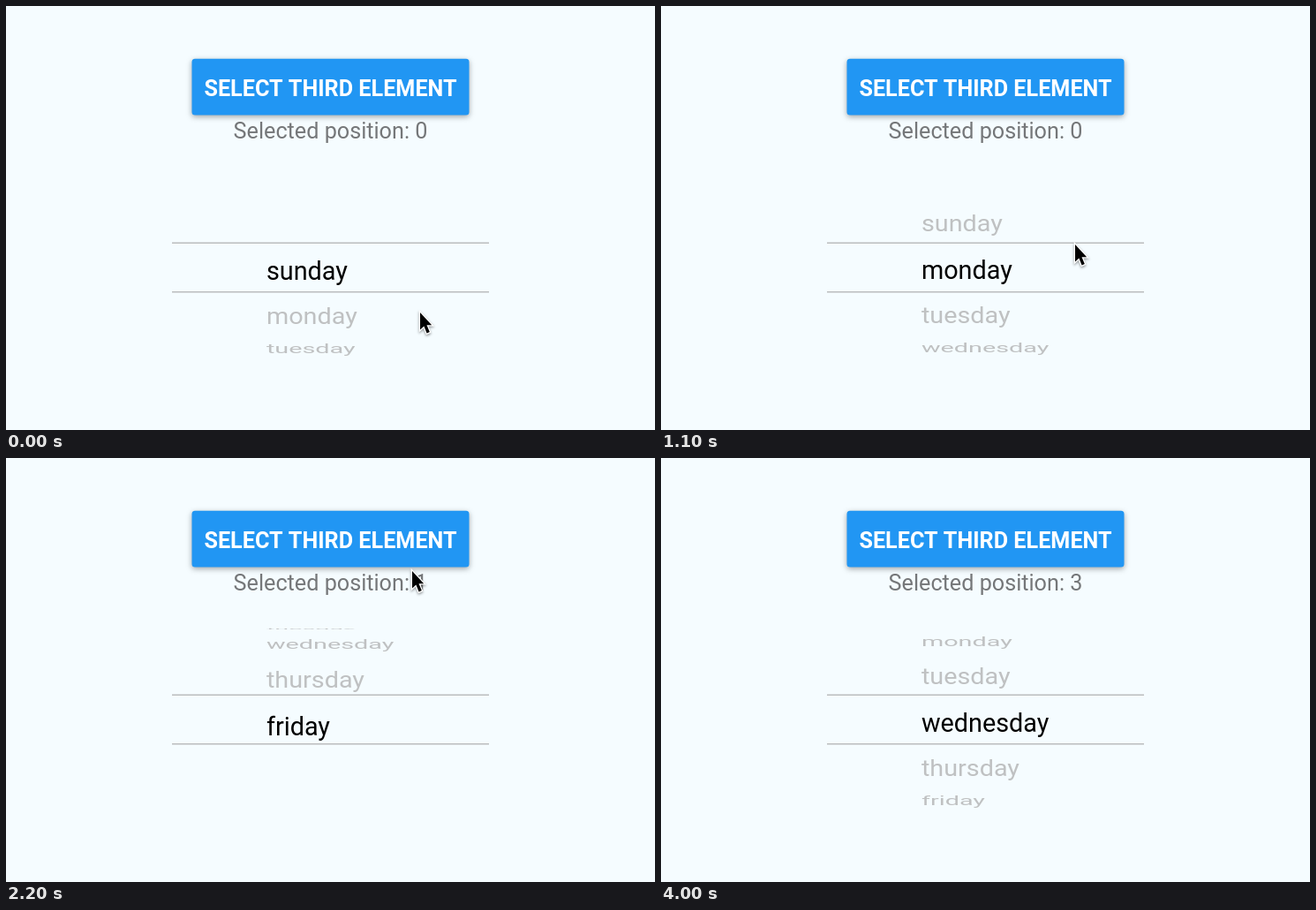
Recreate the animation shown at these times as an HTML page with a canvas. Size 735 by 480 pixels, loop 4200 ms.

```html
<!DOCTYPE html>
<html lang="en">
<head>
<meta charset="utf-8">
<title>Wheel picker</title>
<style>
  html, body { margin: 0; width: 100%; height: 100%; overflow: hidden; background: #f5fcff; }
  canvas { display: block; }
</style>
</head>
<body>
<canvas id="stage" width="735" height="480"></canvas>
<script>
const ctx = document.getElementById('stage').getContext('2d');
const LOOP = 4200, STEP = 100;
const DAYS = ['sunday', 'monday', 'tuesday', 'wednesday', 'thursday', 'friday'];
const WHEEL = { x: 294.9, y: 296.5, radius: 103.5, top: 268, bottom: 323.5, left: 188, right: 547 };
const ITEM_ANGLE = Math.PI / 6, ITEM_HEIGHT = WHEEL.radius * ITEM_ANGLE;
const TOUCH_SLOP = 14, SETTLE = 400, REPORT_DELAY = 200;
const PRESS = 3400, SELECT = 3500, PRESS_END = 4000;
const GRAY = '#bfc1c2';

const clamp = v => Math.max(0, Math.min(1, v));

// The pointer makes five curved moves and rests between them.
const home = { x: 469, y: 347 };
const moves = [
  { start: 200, end: 800, bend: { x: 469, y: 225 }, to: { x: 469, y: 270 } },
  { start: 1200, end: 1500, bend: { x: 462, y: 290 }, to: { x: 438, y: 320 } },
  { start: 1500, end: 2000, bend: { x: 456, y: 137 }, to: { x: 460, y: 128 } },
  { start: 2400, end: 2700, bend: { x: 510, y: 160 }, to: { x: 560, y: 193 } },
  { start: 2800, end: 3200, bend: { x: 380, y: 24 }, to: { x: 342, y: 87 } }
];

function cursorAt(t) {
  let from = home;
  for (const { start, end, bend, to } of moves) {
    if (t < end) {
      const p = clamp((t - start) / (end - start)), q = 1 - p;
      const curve = axis => q * q * from[axis] + 2 * p * q * bend[axis] + p * p * to[axis];
      return { x: curve('x'), y: curve('y') };
    }
    from = to;
  }
  return from;
}

// A drag turns the wheel with the pointer; on release it slows down into its target.
const drags = [
  { start: 200, release: 800, touchY: 347, from: 0, target: 1 },
  { start: 1500, release: 1900, touchY: 298, from: 1, target: 5 }
];

function wheelAt(t) {
  if (t >= SELECT) return 3;
  const drag = drags.findLast(d => t >= d.start);
  if (!drag) return 0;
  const travel = drag.touchY - TOUCH_SLOP - cursorAt(Math.min(t, drag.release)).y;
  const dragged = drag.from + Math.max(0, travel) / ITEM_HEIGHT;
  const left = 1 - clamp((t - drag.release) / SETTLE);
  return drag.target + (dragged - drag.target) * left * left;
}

function selectedAt(t) {
  if (t >= SELECT) return 3;
  const done = drags.findLast(d => t >= d.release + SETTLE + REPORT_DELAY);
  return done ? done.target : 0;
}

function setShadow(color, blur, y) {
  ctx.shadowColor = color;
  ctx.shadowBlur = blur;
  ctx.shadowOffsetY = y;
}

function label(text, font, color, y) {
  ctx.font = font;
  ctx.fillStyle = color;
  ctx.textAlign = 'center';
  ctx.fillText(text, 367.5, y);
}

function drawButton(t) {
  const press = t < PRESS ? 0 : clamp((PRESS_END - t) / 400);
  ctx.save();
  ctx.beginPath();
  ctx.roundRect(210.5, 59.8, 314, 63.7, 3.5);
  setShadow('rgba(0,0,0,.35)', 6 + 3 * press, 2 + press);
  ctx.fillStyle = '#2196f3';
  ctx.fill();
  setShadow('transparent', 0, 0);
  if (press) {
    ctx.clip();
    ctx.beginPath();
    ctx.arc(342, 88, (t - PRESS + STEP) * 0.6, 0, 2 * Math.PI);
    ctx.fillStyle = `rgba(0,0,0,${0.12 * press})`;
    ctx.fill();
  }
  ctx.restore();
  label('SELECT THIRD ELEMENT', 'bold 25.2px Roboto, sans-serif', '#fff', 102);
}

function drawDays(position, color, top, bottom) {
  ctx.save();
  ctx.beginPath();
  ctx.rect(0, top, 735, bottom - top);
  ctx.clip();
  ctx.font = '28.8px Roboto, sans-serif';
  ctx.textAlign = 'left';
  ctx.fillStyle = color;
  DAYS.forEach((day, i) => {
    const angle = (i - position) * ITEM_ANGLE;
    if (Math.abs(angle) >= Math.PI / 2 - 0.01) return;
    ctx.save();
    ctx.translate(WHEEL.x, WHEEL.y + WHEEL.radius * Math.sin(angle));
    ctx.scale(1, Math.cos(angle));
    ctx.fillText(day, 0, 13);
    ctx.restore();
  });
  ctx.restore();
}

function drawWheel(position) {
  drawDays(position, GRAY, 0, WHEEL.top);
  drawDays(position, '#000', WHEEL.top, WHEEL.bottom);
  drawDays(position, GRAY, WHEEL.bottom, 480);
  ctx.fillStyle = '#bbbdbe';
  for (const y of [WHEEL.top, WHEEL.bottom])
    ctx.fillRect(WHEEL.left, y - 0.5, WHEEL.right - WHEEL.left, 1.5);
}

const arrow = new Path2D('M0 0V19.5L4.4 15.4L7.6 23.4L10.8 22L7.5 14.3H13.2Z');

function drawCursor({ x, y }) {
  ctx.save();
  ctx.translate(x, y);
  setShadow('rgba(0,0,0,.4)', 3, 1.5);
  ctx.lineWidth = 2.6;
  ctx.strokeStyle = '#fff';
  ctx.stroke(arrow);
  setShadow('transparent', 0, 0);
  ctx.fillStyle = '#000';
  ctx.fill(arrow);
  ctx.restore();
}

function draw(now) {
  const t = Math.floor((now % LOOP) / STEP) * STEP;
  ctx.fillStyle = '#f5fcff';
  ctx.fillRect(0, 0, 735, 480);
  label('Selected position: ' + selectedAt(t), '25.2px Roboto, sans-serif', '#757779', 150);
  drawButton(t);
  drawWheel(wheelAt(t));
  if (t < PRESS_END) drawCursor(cursorAt(t));
}

const start = performance.now();
function tick() {
  draw(performance.now() - start);
  requestAnimationFrame(tick);
}
tick();
</script>
</body>
</html>
```
